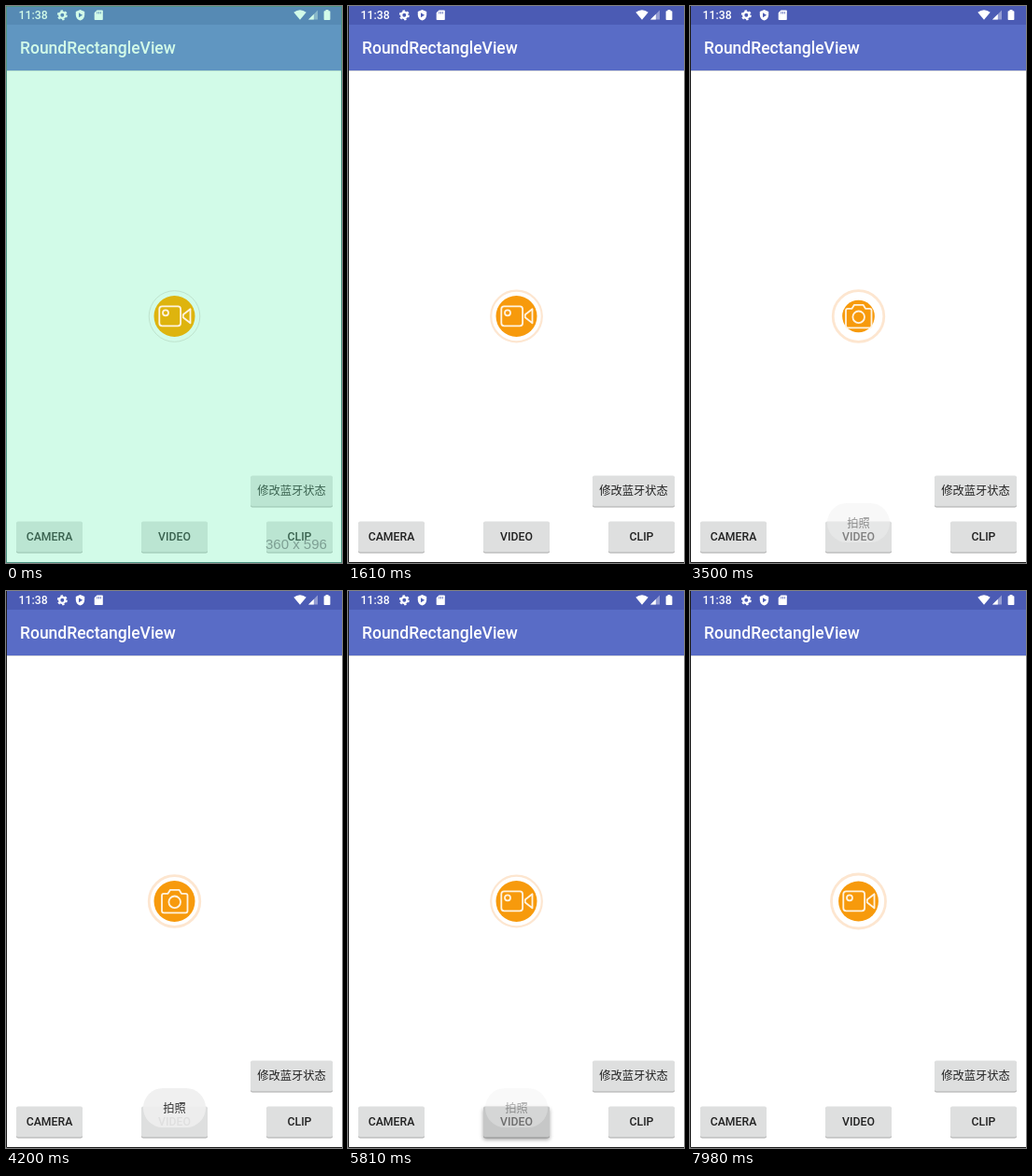
Recreate the animation shown at these times as an HTML page. Size 360 by 596 pixels, loop 8 s.

```html
<!DOCTYPE html>
<html lang="zh">
<head>
<meta charset="utf-8">
<title>RoundRectangleView</title>
<style>
  html, body { margin: 0; width: 100%; height: 100%; overflow: hidden; background: #fff; }
  svg { display: block; width: 360px; height: 596px; }
  text { font: 500 12.26px Roboto, "Noto Sans CJK SC", "Noto Sans CJK", sans-serif; }
  .mid { text-anchor: middle; }
  .cjk { font-family: "Noto Sans CJK SC", "Noto Sans CJK", sans-serif; font-weight: 400; }
  .title { font-size: 17.5px; }
  .size { font: 15px "Liberation Sans", sans-serif; }
  .line { fill: none; stroke: #fff3e0; stroke-width: 1.8; stroke-linejoin: round; }
  .soft { filter: blur(.7px); }
  .deep { filter: blur(2px); }
</style>
</head>
<body>
<svg viewBox="0 0 360 596">
  <rect width="360" height="596" fill="#fff"/>
  <rect width="360" height="69" fill="#596cc6"/>
  <rect width="360" height="20" fill="#4b5bb4"/>
  <rect y="69" width="360" height="1" fill="#000" opacity=".12"/>

  <g fill="#fff">
    <text x="13.5" y="14.3">11:38</text>
    <text class="title" x="15" y="51.3">RoundRectangleView</text>
    <g fill="none" stroke="#fff">
      <circle cx="60.3" cy="9.8" r="3.1" stroke-width="2.2"/>
      <circle cx="60.3" cy="9.8" r="4.7" stroke-width="1.6" stroke-dasharray="2.46"/>
    </g>
    <path d="M79.5 4l4.7 2v3.4c0 3-2 5.300-4.700 6.200c-2.700-.9-4.700-3.200-4.700-6.200V6z"/>
    <path d="M78 7.200v5l4-2.500z" fill="#4b5bb4"/>
    <path d="M97.500 4.500h5.500q.8 0 .8.8v9q0 .8-.8.8h-7.500q-.8 0-.8-.8v-7z"/>
    <path d="M97.800 6.200v2.200M99.600 6.200v2.200M101.400 6.200v2.200" stroke="#4b5bb4" stroke-width=".8"/>
    <path d="M308.300 6.700Q315 1.600 321.700 6.700L315 14.800z"/>
    <path d="M334 4.500v10h-10z" opacity=".4"/>
    <path d="M329.800 8.700v5.800h-5.800z"/>
    <path d="M342.500 4h3v1.200h1.200q.7 0 .7.7v8.400q0 .7-.7.7h-5.400q-.7 0-.7-.7V5.900q0-.7.7-.7h1.200z"/>
  </g>

  <g id="buttons"></g>

  <g id="toast">
    <rect x="147" y="532" width="67" height="42" rx="21" fill="#efefef" opacity=".92"/>
    <text class="mid cjk" x="180.500" y="557.500" fill="#333">拍照</text>
  </g>

  <path d="M.5 0V595.500H360" fill="none" stroke="#1c1c1c"/>

  <g id="tint">
    <rect width="360" height="596" fill="#6ef2b5" opacity=".31"/>
    <path d="M.5.5H359.500V595.500H.5z" fill="none" stroke="#4f9685"/>
    <text class="size" x="278" y="580.500" fill="#7d9f93">360 x 596</text>
  </g>

  <circle id="ring" cx="180.500" cy="332" fill="none"/>
  <circle id="disc" cx="180.500" cy="332"/>
  <g id="video" class="line">
    <rect x="164.300" y="321.300" width="22.800" height="21" rx="3"/>
    <circle cx="171" cy="328.300" r="3"/>
    <path d="M189.800 330.300L197.500 324.200V339.300L189.800 333.300z"/>
  </g>
  <g id="camera" class="line">
    <path d="M169 323.800h4.500l2.500-4h9.500l2.500 4h4.500q2 0 2 2v16.500q0 2-2 2h-23.500q-2 0-2-2v-16.500q0-2 2-2z"/>
    <circle cx="180.700" cy="332.800" r="6.300"/>
  </g>
</svg>
<script>
  const LOOP = 8000, STEP = 70;
  const $ = id => document.getElementById(id);
  const set = (id, attrs) => {
    for (const k in attrs) $(id).setAttribute(k, attrs[k]);
  };

  function button(id, label, x, y, w, cls) {
    const box = `x="${x}" y="${y}" width="${w}" height="33" rx="2"`;
    return `<rect ${box} class="soft" transform="translate(0 .9)" fill="#aaa"/>
      <rect ${box} class="deep" id="${id}Shadow" transform="translate(0 2.500)" fill="#777"/>
      <rect ${box} fill="#dedfdf"/>
      <rect ${box} id="${id}Shade" fill="#000"/>
      <text class="mid ${cls}" x="${x + w / 2}" y="${y + 20.700}" fill="#222">${label}</text>`;
  }
  $('buttons').innerHTML =
    button('state', '修改蓝牙状态', 262, 502.500, 88, 'cjk') +
    button('photo', 'CAMERA', 11, 551.500, 71, '') +
    button('movie', 'VIDEO', 145, 551.500, 71, '') +
    button('clip', 'CLIP', 279, 551.500, 71, '');

  // Linear interpolation through [time, value] points, held at both ends.
  function track(t, ...points) {
    if (t <= points[0][0]) return points[0][1];
    for (let i = 1; i < points.length; i++) {
      const [t0, v0] = points[i - 1], [t1, v1] = points[i];
      if (t <= t1) return v0 + (v1 - v0) * (t - t0) / (t1 - t0);
    }
    return points[points.length - 1][1];
  }

  function press(id, t, start) {
    const p = track(t, [start, 0], [start + 140, 1], [start + 210, .9], [start + 350, 0]);
    set(id + 'Shade', { opacity: .12 * p });
    set(id + 'Shadow', { opacity: .75 * p });
  }

  function draw(now) {
    const t = Math.floor(now % LOOP / STEP) * STEP;
    const tinted = t < 70;
    const photo = t >= 2100 && t < 5740;
    const held = t > 7840;

    set('tint', { visibility: tinted ? 'visible' : 'hidden' });
    set('video', { visibility: photo ? 'hidden' : 'visible' });
    set('camera', { visibility: photo ? 'visible' : 'hidden' });
    set('toast', { opacity: track(t, [3430, 0], [3570, 1], [5600, 1], [5950, 0]) });
    set('ring', {
      r: track(t, [7840, 27.300], [7980, 29]),
      stroke: tinted ? '#bfe3cd' : '#fde6d0',
      'stroke-width': tinted ? 1 : photo || held ? 2.800 : 2.200
    });
    set('disc', {
      r: track(t, [3290, 22], [3430, 15], [3640, 22], [7840, 22], [7980, 21.400]),
      fill: tinted ? '#deb40e' : '#f79a0c'
    });
    press('photo', t, 1960);
    press('movie', t, 5600);
    press('state', t, LOOP);
    press('clip', t, LOOP);
  }

  const begin = performance.now();
  function tick() {
    draw(performance.now() - begin);
    requestAnimationFrame(tick);
  }
  tick();
</script>
</body>
</html>
```
